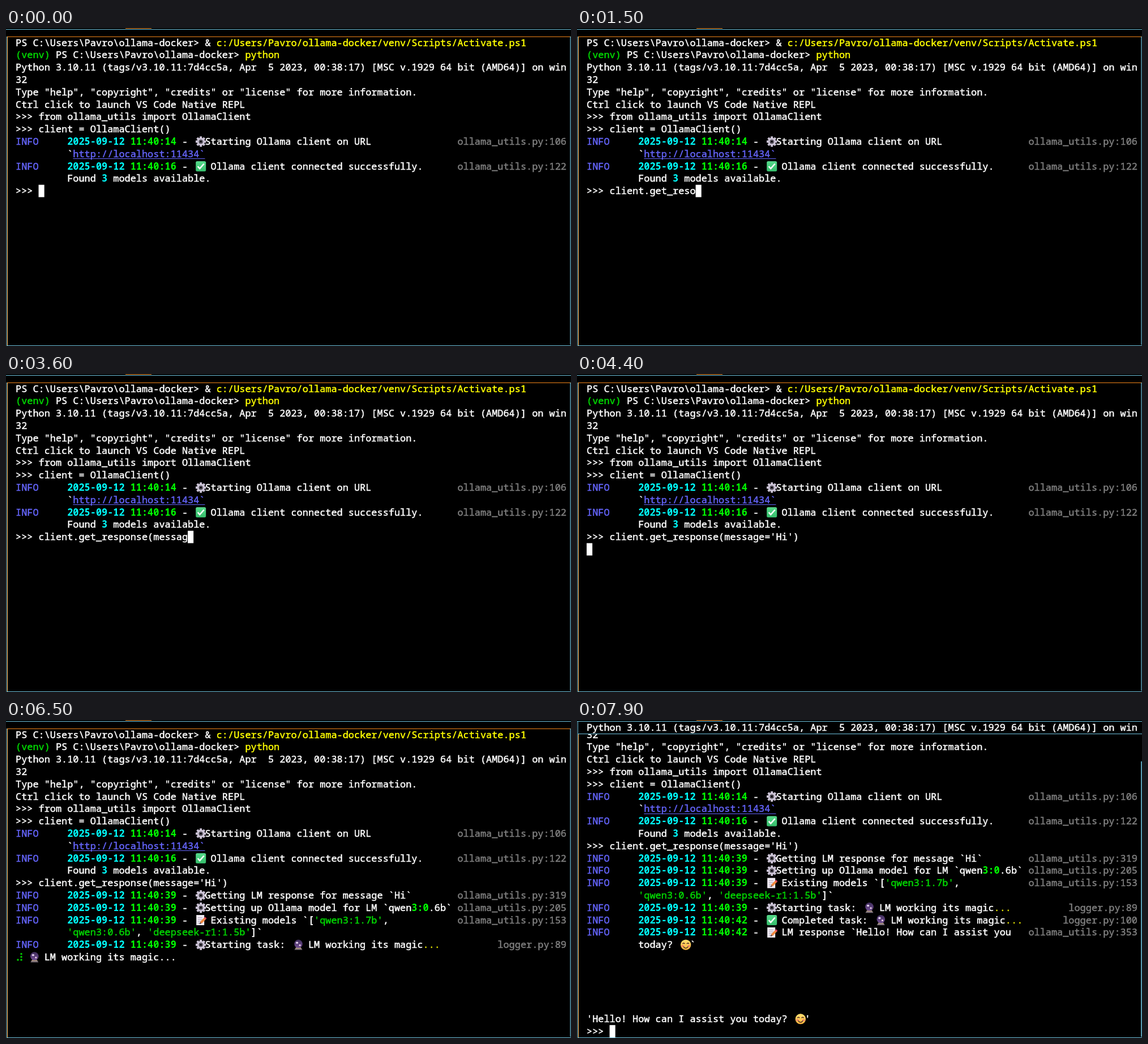
An HTML page with a canvas for the animation above (8000 ms loop, 998 by 561 pixels).

```html
<!DOCTYPE html>
<html lang="en">
<head>
<meta charset="utf-8">
<title>Terminal session</title>
<style>
html, body { margin: 0; width: 100%; height: 100%; overflow: hidden; background: #000; }
canvas { display: block; }
</style>
</head>
<body>
<canvas id="stage" width="998" height="561"></canvas>
<script>
const ctx = document.getElementById('stage').getContext('2d');
const LOOP = 8000, STEP = 100;
const CELL = 10.135, ROW = 21.8, LEFT = 17, TOP = 15;
const FONT = '16.89px "Noto Sans Mono", "DejaVu Sans Mono", monospace';
const TEAL = '#6fc3df', ORANGE = '#f38518';

// Uppercase keys are bold.
const COLORS = {
  w: '#fff', W: '#fff', b: '#6464fa', C: '#0ff', G: '#0f0',
  g: '#00d700', y: '#ff0', o: '#e5e500', d: '#7f7f7f', k: '#000'
};

const log = (time, parts, file) => ({
  parts: [['b', 'INFO     '], ['C', '2025-09-12 '], ['G', time], ['w', ' - '], ...parts],
  file
});
const line = (...parts) => ({ parts });
const plain = text => line(['w', text]);
const utils = n => 'ollama_utils.py:' + n;
const PAD = ' '.repeat(9);
const MAGIC = '🔮 LM working its magic';
const COMMAND = "client.get_response(message='Hi')";
const TYPO = 'client.get_resonse(';
const REPLY = 'Hello! How can I assist you today? 😊';
const ANSWER_ROW = 26;

const rows = [
  line(['w', 'PS C:\\Users\\Pavro\\ollama-docker> & '],
    ['y', 'c:/Users/Pavro/ollama-docker/venv/Scripts/Activate.ps1']),
  line(['g', '(venv)'], ['w', ' PS C:\\Users\\Pavro\\ollama-docker> '], ['y', 'python']),
  plain('Python 3.10.11 (tags/v3.10.11:7d4cc5a, Apr  5 2023, 00:38:17) [MSC v.1929 64 bit (AMD64)] on win'),
  plain('32'),
  plain('Type "help", "copyright", "credits" or "license" for more information.'),
  plain('Ctrl click to launch VS Code Native REPL'),
  plain('>>> from ollama_utils import OllamaClient'),
  plain('>>> client = OllamaClient()'),
  log('11:40:14', [['w', '⚙Starting Ollama client on URL']], utils(106)),
  { parts: [['w', PAD + '`'], ['b', 'http://localhost:11434`']], underline: [10, 33] },
  log('11:40:16', [['w', '✅ Ollama client connected successfully.']], utils(122)),
  line(['w', PAD + 'Found '], ['C', '3'], ['w', ' models available.']),
  plain('>>> ' + COMMAND),
  log('11:40:39', [['w', '⚙Getting LM response for message `Hi`']], utils(319)),
  log('11:40:39', [['w', '⚙Setting up Ollama model for LM `qwen'], ['G', '3:0'], ['w', '.6b`']], utils(205)),
  log('11:40:39', [['w', '📝 Existing models `'], ['W', '['], ['g', "'qwen3:1.7b'"], ['w', ',']], utils(153)),
  line(['g', PAD + "'qwen3:0.6b'"], ['w', ', '], ['g', "'deepseek-r1:1.5b'"], ['W', ']'], ['w', '`']),
  log('11:40:39', [['w', '⚙Starting task: ' + MAGIC], ['o', '...']], 'logger.py:89'),
  log('11:40:42', [['w', '✅ Completed task: ' + MAGIC], ['o', '...']], 'logger.py:100'),
  log('11:40:42', [['w', '📝 LM response `Hello! How can I assist you']], utils(353)),
  plain(PAD + 'today? 😊`')
];

function rect(color, x, y, w, h) {
  ctx.fillStyle = color;
  ctx.fillRect(x, y, w, h);
}

function disc(color, x, y, rx, ry = rx) {
  ctx.fillStyle = color;
  ctx.beginPath();
  ctx.ellipse(x, y, rx, ry, 0, 0, Math.PI * 2);
  ctx.fill();
}

function stroke(color, width, points) {
  ctx.strokeStyle = color;
  ctx.lineWidth = width;
  ctx.beginPath();
  points.forEach(([x, y]) => ctx.lineTo(x, y));
  ctx.stroke();
}

function shade(from, to, r) {
  const g = ctx.createLinearGradient(0, -r, 0, r);
  g.addColorStop(0, from);
  g.addColorStop(1, to);
  return g;
}

// Each icon is drawn around its own centre and spans two cells.
const icons = {
  '⚙'() {
    for (let i = 0; i < 8; i++) {
      ctx.save();
      ctx.rotate(i * Math.PI / 4);
      rect('#cbc3d5', -2, -9.2, 4, 4);
      ctx.restore();
    }
    ctx.strokeStyle = '#cbc3d5';
    ctx.lineWidth = 3.4;
    ctx.beginPath();
    ctx.arc(0, 0, 5.2, 0, Math.PI * 2);
    ctx.stroke();
    disc('#8d8499', 0, 0, 2.8);
    disc('#000', 0, 0, 1.9);
  },
  '✅'() {
    ctx.fillStyle = shade('#55d98a', '#35bd6b', 9);
    ctx.beginPath();
    ctx.roundRect(-9, -9, 18, 18, 2.5);
    ctx.fill();
    stroke('#fff', 2.5, [[-5.5, 0], [-2, 4], [5.5, -4.5]]);
  },
  '📝'() {
    rect('#f2edf5', -8, -9, 14, 18);
    for (let y = -5; y <= 5; y += 3.3) rect('#b3a9bf', -5.5, y, 8, 1.2);
    stroke('#f0883e', 4, [[7.5, -3], [0, 4.5]]);
    stroke('#e0435c', 4, [[8.8, -4.3], [7, -2.5]]);
    stroke('#5a3a35', 2, [[0, 4.5], [-2, 6.5]]);
  },
  '🔮'() {
    ctx.fillStyle = '#7d717c';
    ctx.beginPath();
    ctx.moveTo(-4, 4);
    ctx.lineTo(4, 4);
    ctx.lineTo(7, 9);
    ctx.lineTo(-7, 9);
    ctx.fill();
    disc(shade('#43305f', '#7d55a0', 8), 0, -1.8, 7.3);
    disc('#e6d3f0', -2.4, -3.6, 2.2, 1.8);
    disc('#f4d9ea', 2.6, 0.6, 1.5);
    rect('#b59a78', -5, 5.5, 10, 1.3);
  },
  '😊'() {
    disc(shade('#ffdf70', '#fbb43c', 9), 0, 0, 9.2);
    disc('#f4806a', -5.6, 2, 2.3, 1.7);
    disc('#f4806a', 5.6, 2, 2.3, 1.7);
    ctx.strokeStyle = '#4d2d2b';
    ctx.lineWidth = 1.5;
    for (const [x, y, r, a, b] of [
      [-3.7, -1, 2, 1.1, 1.9], [3.7, -1, 2, 1.1, 1.9], [0, 1.6, 4.2, 0.1, 0.9]
    ]) {
      ctx.beginPath();
      ctx.arc(x, y, r, a * Math.PI, b * Math.PI);
      ctx.stroke();
    }
  }
};

const colX = col => LEFT + col * CELL;
const rowY = row => TOP + row * ROW;

// A thin outline gives the regular weight its sturdier stems.
function glyph(ch, x, y, style) {
  const bold = style < 'a';
  ctx.font = (bold ? 'bold ' : '') + FONT;
  ctx.fillStyle = ctx.strokeStyle = COLORS[style];
  ctx.fillText(ch, x, y);
  if (!bold) {
    ctx.lineWidth = 0.5;
    ctx.strokeText(ch, x, y);
  }
}

// Places text on the cell grid and returns the next free column.
function put(y, col, style, text) {
  for (const ch of text) {
    const x = colX(col);
    if (icons[ch]) {
      ctx.save();
      ctx.translate(x + 13, y + 11);
      icons[ch]();
      ctx.restore();
      col += 2;
      continue;
    }
    if (ch !== ' ') glyph(ch, x, Math.round(y + 16.6), style);
    col++;
  }
  return col;
}

function putRow(y, { parts, file, underline }) {
  let col = 0;
  for (const [style, text] of parts) col = put(y, col, style, text);
  if (file) put(y, 96 - file.length, 'd', file);
  if (underline) {
    const [a, b] = underline.map(colX);
    rect(COLORS.b, a, Math.round(y + 19), b - a, 1);
  }
}

function cursor(row, col) {
  rect('#fff', colX(col), rowY(row), CELL, ROW);
}

function spinner(row, index) {
  const bits = '⠋⠙⠹⠸⠼⠴⠦⠧⠇⠏'.codePointAt(index % 10) - 0x2800;
  for (let i = 0; i < 6; i++) {
    if (bits >> i & 1) {
      rect(COLORS.g, i < 3 ? 19.5 : 25.5, rowY(row) + 3.8 + (i % 3) * 5.2, 3, 3);
    }
  }
}

function typed(n) {
  if (n <= 19) return TYPO.slice(0, n);
  if (n <= 24) return TYPO.slice(0, 38 - n);
  return COMMAND.slice(0, n - 10);
}

function borders() {
  rect(TEAL, 0, 2, 998, 1);
  rect(ORANGE, 211, 0, 46, 1);
  rect(ORANGE, 2, 15, 996, 1);
  rect(ORANGE, 2, 15, 1, 545);
  rect(TEAL, 1, 15, 1, 545);
  rect(TEAL, 1, 560, 997, 1);
}

function stickyHeader() {
  rect('#000', 1, 3, 997, 21);
  putRow(2, rows[2]);
  rect(TEAL, 1, 24, 997, 1);
  rect(TEAL, 1, 3, 1, 21);
}

function slider(scroll, alpha) {
  const y = Math.round(TOP + 545 * scroll / (25 + scroll));
  ctx.globalAlpha = alpha;
  rect(TEAL, 996, y, 2, 559 - y);
  ctx.globalAlpha = 1;
}

function draw(time) {
  const n = Math.floor(time / STEP);
  const scroll = n < 71 ? 0 : n < 73 ? 2 : 3;
  const count = n < 44 ? 12 : n < 45 ? 13 : n < 46 ? 15 : n < 71 ? 18 : 21;

  rect('#000', 0, 0, 998, 561);
  for (let i = scroll; i < count; i++) putRow(rowY(i - scroll), rows[i]);

  if (n < 44) {
    cursor(12, put(rowY(12), 0, 'w', '>>> ' + typed(n)));
  } else if (n < 46) {
    cursor(count, 0);
  } else if (n < 71) {
    spinner(18, Math.floor((n * STEP - 4560) / 80));
    put(rowY(18), 2, 'w', MAGIC + '...');
  } else {
    const row = ANSWER_ROW - scroll;
    const open = n < 73;
    if (open) cursor(row, 0);
    put(rowY(row), 0, open ? 'k' : 'w', "'");
    put(rowY(row), 1, 'w', REPLY + "'");
    if (!open) cursor(row + 1, put(rowY(row + 1), 0, 'w', '>>> '));
  }

  borders();
  slider(scroll, n < 79 ? 0.6 : 0.8);
  if (n >= 74) stickyHeader();
}

const start = performance.now();
function tick() {
  draw((performance.now() - start) % LOOP);
  requestAnimationFrame(tick);
}
tick();
</script>
</body>
</html>
```
